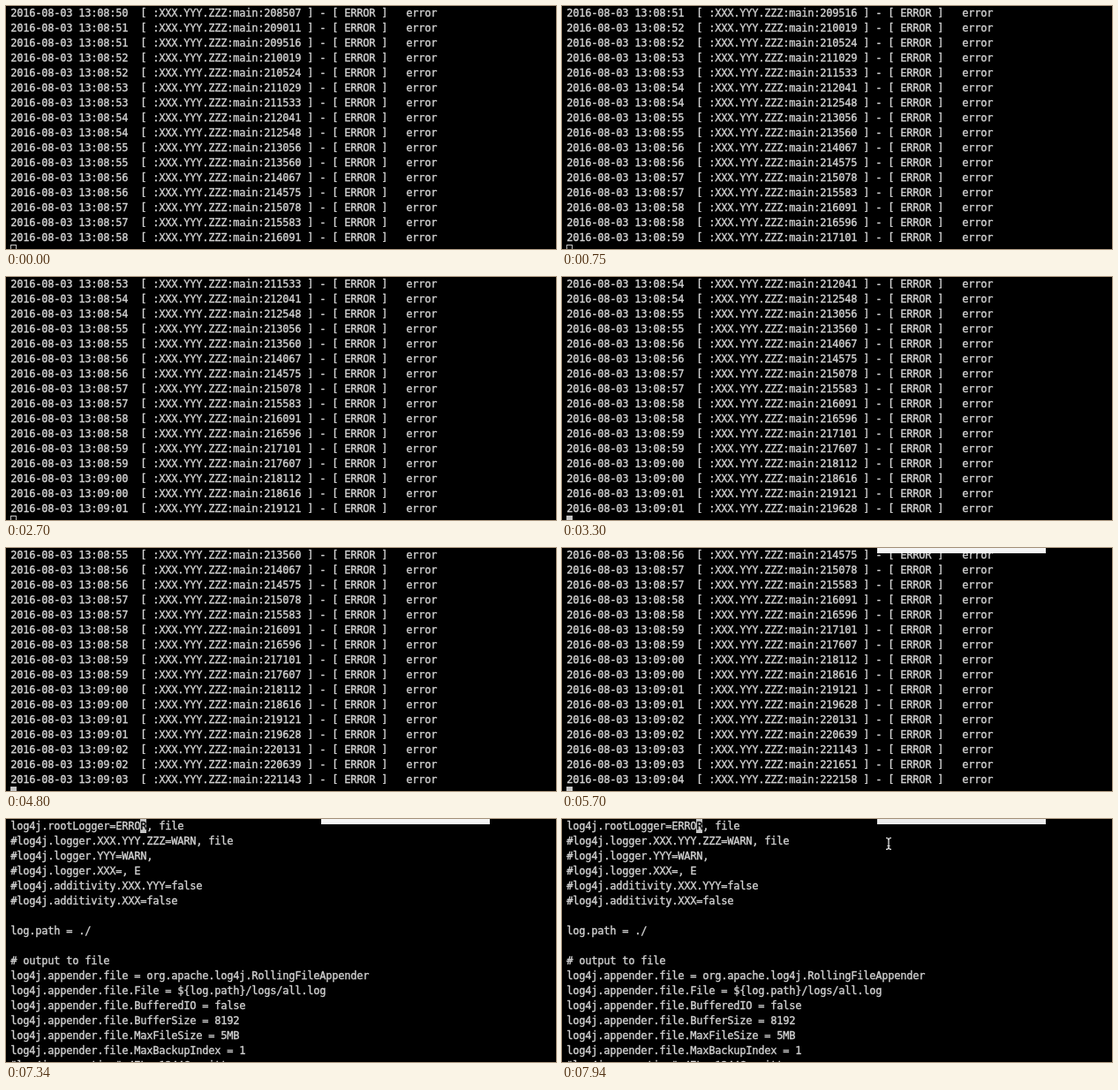
Write an HTML page with a canvas that moves like this. It is 623 by 276 pixels and loops after 8 s.

```html
<!DOCTYPE html>
<html lang="en">
<head>
<meta charset="utf-8">
<title>Log terminal</title>
<style>
html, body { margin: 0; width: 100%; height: 100%; overflow: hidden; background: #000; }
canvas { display: block; }
</style>
</head>
<body>
<canvas id="stage" width="623" height="276"></canvas>
<script>
const ctx = document.getElementById('stage').getContext('2d');
const LOOP = 8000, ROWS = 16, LINE = 17, CHAR = 7, LEFT = 5;
const INK = '#d2d2d2', BLOCK = '#c4c4c4';

const scrolls = [150, 750, 1200, 1800, 2250, 2700, 3300, 3750, 4200, 4800, 5250, 5700, 6290, 6740];
const FOCUS = 2850, BAR = 5100, EDITOR = 7340, MOUSE = 7790, MOVED = 7940;

// Each entry comes 500 ms plus a few ms of drift after the one before.
const drift = '45355487847835855654573848746';
const log = [];
for (let i = 0, ms = 208507; i <= drift.length; ms += 500 + Number(drift[i++])) {
  const sec = Math.floor(ms / 1000) - 158;
  const min = 8 + Math.floor(sec / 60);
  const clock = `13:0${min}:${String(sec % 60).padStart(2, '0')}`;
  log.push(`2016-08-03 ${clock}  [ :XXX.YYY.ZZZ:main:${ms} ] - [ ERROR ]   error`);
}

const config = `log4j.rootLogger=ERROR, file
#log4j.logger.XXX.YYY.ZZZ=WARN, file
#log4j.logger.YYY=WARN,
#log4j.logger.XXX=, E
#log4j.additivity.XXX.YYY=false
#log4j.additivity.XXX=false

log.path = ./

# output to file
log4j.appender.file = org.apache.log4j.RollingFileAppender
log4j.appender.file.File = \${log.path}/logs/all.log
log4j.appender.file.BufferedIO = false
log4j.appender.file.BufferSize = 8192
log4j.appender.file.MaxFileSize = 5MB
log4j.appender.file.MaxBackupIndex = 1
"log4j.properties" 47L, 1344C written`.split('\n');

// Keep the type on the terminal's character grid.
ctx.font = '12px "DejaVu Sans Mono", monospace';
ctx.letterSpacing = `${CHAR - ctx.measureText('0').width}px`;
ctx.lineJoin = 'round';

function rect(x, y, w, h, color) {
  ctx.fillStyle = color;
  ctx.fillRect(x, y, w, h);
}

// A thin outline gives the type its heavier weight.
function text(s, col, row, color = INK) {
  const x = LEFT + 0.3 + col * CHAR, y = 12 + row * LINE;
  ctx.fillStyle = ctx.strokeStyle = color;
  ctx.lineWidth = 0.35;
  ctx.fillText(s, x, y);
  ctx.strokeText(s, x, y);
}

function block(col, row) {
  rect(LEFT + col * CHAR, row * LINE - 1, CHAR, LINE, BLOCK);
}

function terminal(t) {
  const first = scrolls.filter(s => s <= t).length;
  log.slice(first, first + ROWS).forEach((s, row) => text(s, 0, row));
  block(0, ROWS);
  if (t < FOCUS) rect(LEFT + 1, ROWS * LINE, CHAR - 2, LINE, '#000');
}

function editor() {
  config.forEach((s, row) => text(s, 0, row));
  block(21, 0);
  text('R', 21, 0, '#000');
}

function beam(x, y) {
  ctx.beginPath();
  ctx.moveTo(x + 1, y + 1.5);
  ctx.quadraticCurveTo(x + 4, y + 1.5, x + 4, y + 4);
  ctx.lineTo(x + 4, y + 12);
  ctx.quadraticCurveTo(x + 4, y + 14.5, x + 1, y + 14.5);
  ctx.moveTo(x + 7, y + 1.5);
  ctx.quadraticCurveTo(x + 4, y + 1.5, x + 4, y + 4);
  ctx.moveTo(x + 4, y + 12);
  ctx.quadraticCurveTo(x + 4, y + 14.5, x + 7, y + 14.5);
  ctx.moveTo(x + 2.5, y + 10.5);
  ctx.lineTo(x + 5.5, y + 10.5);
  for (const [width, color] of [[2.4, '#222'], [1.2, '#e0e0e0']]) {
    ctx.lineWidth = width;
    ctx.strokeStyle = color;
    ctx.stroke();
  }
}

function draw(now) {
  const t = now % LOOP;
  rect(0, 0, 623, 276, '#000');
  if (t < EDITOR) terminal(t); else editor();
  if (t >= BAR) rect(357, 0, 191, 6, t < MOVED ? '#f5f5f5' : '#ececec');
  if (t >= MOVED) beam(366, 20);
  else if (t >= MOUSE) beam(375, 3);
  requestAnimationFrame(draw);
}
requestAnimationFrame(draw);
</script>
</body>
</html>
```
